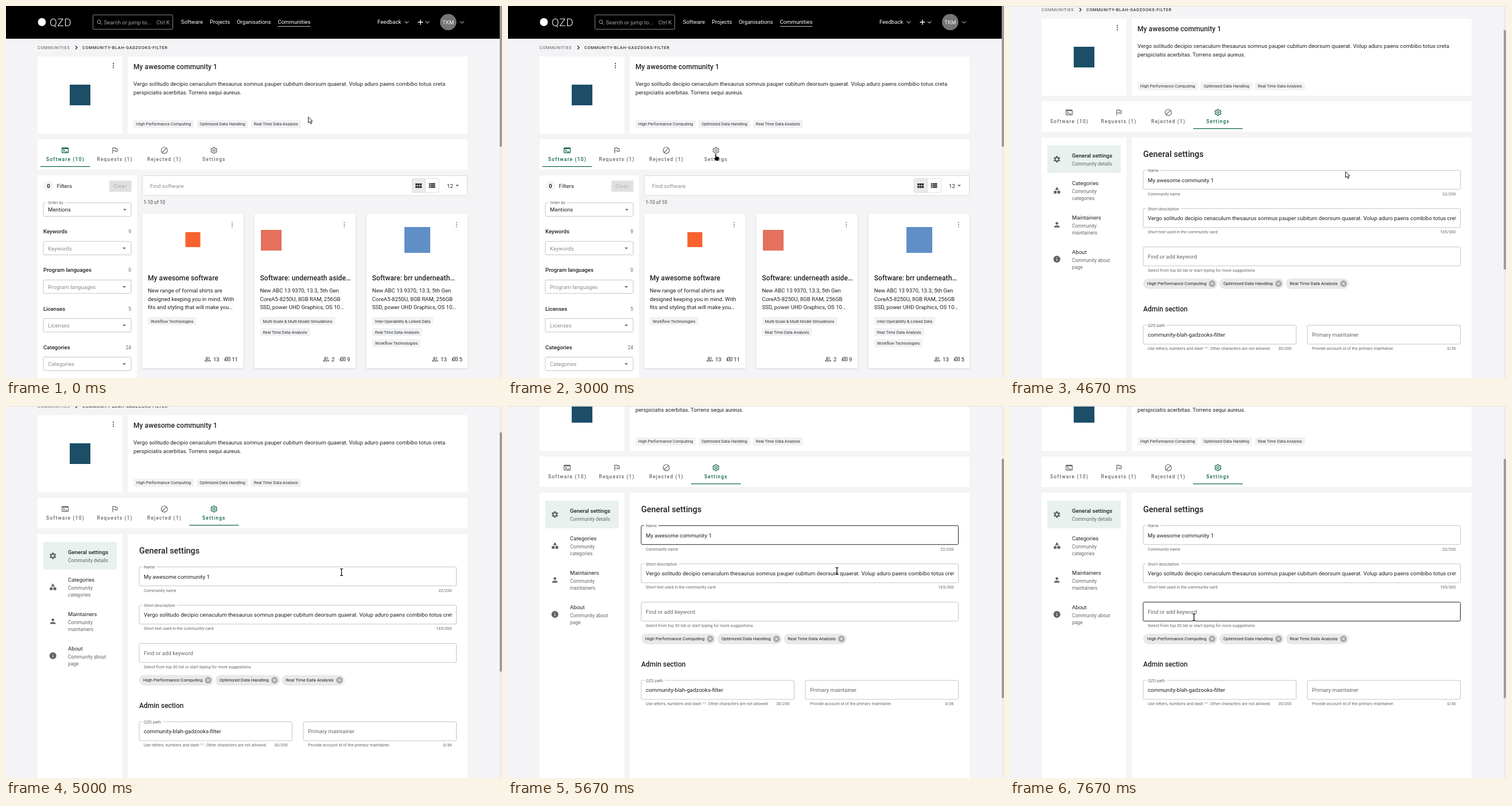
An HTML page that plays this animation: 864x648 px, repeating every 8 s.

```html
<!DOCTYPE html>
<html lang="en">
<head>
<meta charset="utf-8">
<title>Community settings</title>
<style>
  html, body { margin: 0; width: 100%; height: 100%; overflow: hidden; background: #f4f4f6; }
  svg { display: block; font-family: Roboto, sans-serif; }
  .border { fill: none; stroke: #c4c4c4; }
  .border.hover { stroke: #212121; }
  #menu.hover { fill: #dfe9e6; }
  .card { filter: drop-shadow(0 1px 1.5px #0002); }
</style>
</head>
<body>
<svg id="stage" width="864" height="648" viewBox="0 0 864 648"></svg>
<script>
const INK = '#212121', GREY = '#666', PALE = '#8c8c8c', GREEN = '#0a6148';
const LOOP = 8000;
const ruler = document.createElement('canvas').getContext('2d');

const measure = (label, size) => {
  ruler.font = `${size}px Roboto, sans-serif`;
  return ruler.measureText(label.replace('&amp;', '&')).width;
};
const text = (x, y, label, size = 9.6, fill = INK, more = '') =>
  `<text x="${x}" y="${y}" font-size="${size}" fill="${fill}" ${more}>${label}</text>`;
const bold = 'font-weight="500" ', end = 'text-anchor="end"', middle = 'text-anchor="middle" ';
const spaced = n => `letter-spacing="${n}"`;
const title = (x, y, label) => text(x, y, label, 12, INK, bold + spaced(.08));
const rect = (x, y, w, h, fill = '#fff', more = '') =>
  `<rect x="${x}" y="${y}" width="${w}" height="${h}" fill="${fill}" ${more}/>`;
const circle = (x, y, r, fill) => `<circle cx="${x}" cy="${y}" r="${r}" fill="${fill}"/>`;
const line = (d, stroke, width = 1) =>
  `<path d="${d}" fill="none" stroke="${stroke}" stroke-width="${width}"/>`;
const chevron = (x, y, color) => line(`M${x - 3.3} ${y - 1.7}l3.3 3.4 3.3-3.4`, color);
const triangle = (x, y) => `<path d="M${x - 3} ${y - 1.5}h6l-3 3z" fill="${GREY}"/>`;
const dots = (x, y, fill) => [-3.6, 0, 3.6].map(d => circle(x, y + d, 1.15, fill)).join('');
const border = (x, y, w, h, id = '') =>
  `<rect class="border" id="${id}" x="${x}" y="${y}" width="${w}" height="${h}" rx="2"/>`;
const notch = (x, y, label) =>
  rect(x - 3, y - 5, measure(label, 7.2) + 6, 8) + text(x, y, label, 7.2, GREY);

// Icons are drawn on a 24 unit grid
const icon = (x, y, shape, color, scale = .6) =>
  `<g transform="translate(${x - 12 * scale} ${y - 12 * scale}) scale(${scale})" fill="${color}"
    color="${color}" fill-rule="evenodd">${shape}</g>`;
const solid = d => `<path d="${d}"/>`;
const outline = (d, width = 2) => line(d, 'currentColor', width);
const ring = (x, y, r) => `M${x - r} ${y}a${r} ${r} 0 1 0 ${2 * r} 0a${r} ${r} 0 1 0 ${-2 * r} 0z`;
const gear = (inner, outer) => {
  const points = [];
  for (let tooth = 0; tooth < 6; tooth++) {
    for (const [offset, r] of [[-.36, inner], [-.22, outer], [.22, outer], [.36, inner]]) {
      const angle = Math.PI / 2 + tooth * Math.PI / 3 + offset;
      points.push((12 + r * Math.cos(angle)).toFixed(2) + ' ' + (12 + r * Math.sin(angle)).toFixed(2));
    }
  }
  return `M${points.join('L')}z`;
};
const icons = {
  terminal: solid('M4 4h16a2 2 0 0 1 2 2v12a2 2 0 0 1-2 2H4a2 2 0 0 1-2-2V6a2 2 0 0 1 2-2zM4 8v10h16V8zM12 15h6v2h-6zM7.5 17 6 15.6 8.6 13 6 10.4 7.5 9l4 4z'),
  flag: solid('M14 4H5v17h2v-7h5.6l.4 2h7V6h-5.6zM7 6h5.4l.4 2H18v6h-3l-.4-2H7z'),
  block: outline(ring(12, 12, 9) + 'M18.4 5.6 5.6 18.4'),
  gearOutline: outline(gear(6.6, 9.2) + ring(12, 12, 2.8), 1.8),
  gear: solid(gear(7, 10) + ring(12, 12, 3.5)),
  shapes: solid('M12 2l5.5 9h-11zM3 13.5h8v8H3z' + ring(17.5, 17.5, 4.5)),
  person: solid(ring(12, 8, 4) + 'M4 20v-2c0-2.7 5.3-4 8-4s8 1.3 8 4v2z'),
  info: solid(ring(12, 12, 10) + 'M11 7h2v2h-2zM11 11h2v6h-2z'),
  people: outline(ring(9, 8, 3.2) + 'M2 19v-1.5c0-5 14-5 14 0V19zM15 4.8a3.2 3.2 0 0 1 0 6.4M18 14q4 1 4 5h-3', 1.8),
  mention: outline('M5 5h17v13H5zM5 10H2v8h3M9 9.5h9M9 13.5h9', 1.8),
  grid: solid('M3 5h5.3v6H3zM9.4 5h5.3v6H9.4zM15.8 5H21v6h-5.2zM3 12.3h5.3v6H3zM9.4 12.3h5.3v6H9.4zM15.8 12.3H21v6h-5.2z'),
  list: solid('M3 5h4v4H3zM8 5h13v4H8zM3 10h4v4H3zM8 10h13v4H8zM3 15h4v4H3zM8 15h13v4H8z'),
};

const tag = (x, y, label) =>
  rect(x, y, measure(label, 7.2) + 10, 14, '#f1f2f4', 'rx="1.5"') + text(x + 5, y + 9.7, label, 7.2, '#333');
const chip = (x, y, w, label) =>
  rect(x, y, w, 18.6, '#e9e9e9', 'rx="9.3"') + text(x + 7, y + 12, label, 7.8) +
  circle(x + w - 9.2, y + 9.3, 5.6, '#a6a6a6') +
  line(`M${x + w - 11.4} ${y + 7.1}l4.4 4.4m0-4.4l-4.4 4.4`, '#eee', 1.1);
const row = (x, gap, padding, size, labels, draw) => labels.map(label => {
  const w = measure(label, size) + padding;
  const out = draw(x, w, label);
  x += w + gap;
  return out;
}).join('');

const intro = 'Vergo solitudo decipio cenaculum thesaurus somnus pauper cubitum deorsum quaerat. Volup aduro paens combibo totus creta';
const keywords = ['High Performance Computing', 'Optimized Data Handling', 'Real Time Data Analysis'];

const header = () =>
  rect(0, 0, 864, 57, '#000') + circle(62.5, 28, 6.9, '#fff') +
  text(76, 35, 'QZD', 19, '#fff', 'font-weight="300" ' + spaced(.5)) +
  rect(151.5, 15.5, 139, 25, 'none', 'stroke="#858585" rx="1"') +
  line(ring(162, 27.5, 3) + 'M164.2 29.8l3 3', '#aaa') +
  text(170.5, 31.5, 'Search or jump to...', 9.6, '#a3a3a3') + text(262, 31.5, 'Ctrl K', 9.6, '#a3a3a3') +
  [[304.7, 'Software'], [355, 'Projects'], [402, 'Organisations'], [473.4, 'Communities'], [647, 'Feedback']]
    .map(([x, label]) => text(x, 31.3, label, 9.6, '#fff')).join('') +
  line('M473.5 35.5h57', '#bbb') + chevron(698, 28.3, '#fff') +
  line('M717.5 28.3h9m-4.5-4.5v9', '#fff', 1.4) + chevron(734, 28.3, '#fff') +
  circle(770.3, 28, 14.3, '#757575') + text(770.3, 31.5, 'TKM', 9.6, '#eee', middle) +
  chevron(794.5, 28.3, '#fff');

const summary = () =>
  text(55, 75, 'COMMUNITIES', 7.2, '#555', spaced(.72)) + line('M121 69.5l3 3-3 3', INK, 1.2) +
  text(133, 75, 'COMMUNITY-BLAH-GADZOOKS-FILTER', 7.2, '#333', bold + spaced(.72)) +
  rect(55, 88, 148, 134.5) + rect(212, 88, 592, 134.5) + dots(187, 103.8, '#555') +
  rect(111, 137, 36, 36, '#1c4e68') +
  title(222, 110.3, 'My awesome community 1') +
  text(222, 139.3, intro) + text(222, 153.7, 'perspiciatis acerbitas. Torrens sequi aureus.') +
  row(222, 5, 10, 7.2, keywords, (x, w, label) => tag(x, 198.7, label));

const tabs = active =>
  rect(55, 232, 749, 53) +
  [[103, 70, 'Software (10)', 'terminal'], [189.5, 158.5, 'Requests (1)', 'flag'],
   [275.8, 246, 'Rejected (1)', 'block'], [362.2, 342, 'Settings', 'gearOutline']]
    .map(([center, x, label, name], i) => {
      const color = i === active ? GREEN : GREY;
      return icon(center, 251.4, icons[name], color) +
        text(x, 270, label, 8.4, color, bold + spaced(1.2)) +
        (i === active ? rect(center - 43.2, 279, 86.4, 1.2, GREEN) : '');
    }).join('');

const filter = (label, count, i) => {
  const y = 396.2 + i * 67.2;
  return text(65, y, label, 9.6, INK, bold) + text(218, y, count, 8.4, GREY, end) +
    border(65, y + 13.8, 153, 23.5) + text(73, y + 29.3, label, 9.6, PALE) + triangle(206, y + 26);
};

const productCard = (x, logo, name, lines, tags, people, mentions) => {
  const digit = 5.4, right = x + 167;
  const mentionX = right - digit * mentions.length - 7.5;
  const peopleEnd = mentionX - 14;
  return rect(x, 362, 176.5, 269, '#fff', 'rx="2" class="card"') + dots(x + 157, 381, '#999') + logo +
    title(x + 10, 477.8, name) +
    lines.map((s, i) => text(x + 10, 499.3 + i * 14.4, s)).join('') +
    tags.map((s, i) => tag(x + 10, 541.8 + i * 19.2, s)).join('') +
    icon(peopleEnd - digit * people.length - 9.5, 615.2, icons.people, INK, .48) +
    text(peopleEnd, 618.5, people, 9.6, INK, end) +
    icon(mentionX, 615.2, icons.mention, INK, .45) + text(right, 618.5, mentions, 9.6, INK, end);
};

const laptop = ['New ABC 13 9370, 13.3, 5th Gen', 'CoreA5-8250U, 8GB RAM, 256GB', 'SSD, power UHD Graphics, OS 10…'];
const library = () =>
  tabs(0) + rect(55, 295, 173, 353) +
  circle(74, 313.5, 9, '#f3f4f6') + text(74, 317, '0', 9.6, INK, middle + 'font-weight="700"') +
  text(88.5, 317, 'Filters') + rect(180, 304, 38.5, 19.5, '#e0e0e0', 'rx="1"') +
  text(187, 316.8, 'Clear', 8.4, '#b4b4b4', bold + spaced(.9)) +
  border(65, 342.8, 153, 23.5) + notch(73, 345, 'Order by') + text(73, 358.3, 'Mentions') + triangle(207, 355) +
  [['Keywords', 9], ['Program languages', 0], ['Licenses', 5], ['Categories', 24]]
    .map(([label, count], i) => filter(label, count, i)).join('') +
  rect(237.5, 295.5, 566, 34.5, '#fff', 'stroke="#d9d9d9" rx="2"') + text(251, 316.5, 'Find software', 9.6, PALE) +
  rect(707.5, 300.5, 23, 24.5, '#ebebeb') + rect(707.5, 300.5, 46.5, 24.5, 'none', 'stroke="#dcdcdc" rx="2"') +
  line('M730.5 300.5v24.5', '#dcdcdc') +
  icon(718.7, 313.2, icons.grid, '#222') + icon(742.2, 312.8, icons.list, '#444') +
  text(768, 316.5, '12') + triangle(786, 313) + text(239.6, 344.5, '1-10 of 10', 8.4, '#444') +
  productCard(237, rect(312.5, 394, 26, 26, '#f7622e'), 'My awesome software',
    ['New range of formal shirts are', 'designed keeping you in mind. With', 'fits and styling that will make you…'],
    ['Workflow Technologies'], '13', '11') +
  productCard(432.4, rect(444, 390, 36, 36, '#e5705d'), 'Software: underneath aside…', laptop,
    ['Multi-Scale &amp; Multi Model Simulations', 'Real Time Data Analysis'], '2', '9') +
  productCard(627.8, rect(694, 385, 45, 45, '#5f8fc6'), 'Software: brr underneath…', laptop,
    ['Inter-Operability &amp; Linked Data', 'Real Time Data Analysis', 'Workflow Technologies'], '13', '5');

const field = ({ id, x = 232, y, w = 552.5, label, value, hint, help, count = '' }) =>
  border(x, y, w, 33, id) + (label ? notch(x + 8, y + 2.7, label) : '') +
  `<svg x="${x + 8}" y="${y}" width="${w - 16}" height="33">${text(0, 20.4, value || hint, 9.6, value ? INK : GREY)}</svg>` +
  text(x + 8, y + 43.3, help, 7.2, GREY) + text(x + w - 8, y + 43.3, count, 7.2, GREY, end);

const settings = () =>
  tabs(3) + rect(55, 295, 148, 750) + rect(212, 295, 592, 750) +
  rect(65, 309, 128, 48, '#e8f1ee', 'id="menu"') +
  [['gear', 333, 'General settings', 'Community details'], ['shapes', 387, 'Categories', 'Community', 'categories'],
   ['person', 447, 'Maintainers', 'Community', 'maintainers'], ['info', 507, 'About', 'Community about', 'page']]
    .map(([name, y, label, ...lines], i) => {
      const top = y - (i ? 9 : 3);
      return icon(81.7, y, icons[name], '#636363') + text(108, top, label, 9.6, INK, i ? '' : bold) +
        lines.map((s, n) => text(108, top + 13.6 + n * 12, s, 8.4, GREY)).join('');
    }).join('') +
  text(232, 328.5, 'General settings', 14.4, INK, bold) +
  field({ id: 'name', y: 352.3, label: 'Name', value: 'My awesome community 1', help: 'Community name', count: '22/200' }) +
  field({ id: 'about', y: 418.9, label: 'Short description', value: intro, help: 'Short text used in the community card', count: '165/300' }) +
  field({ id: 'keyword', y: 485.7, hint: 'Find or add keyword', help: 'Select from top 30 list or start typing for more suggestions' }) +
  row(232, 3.4, 26, 7.8, keywords, (x, w, label) => chip(x, 540.4, w, label)) +
  text(232, 598.3, 'Admin section', 12, INK, bold) +
  field({ id: 'path', y: 622, w: 266.5, label: 'QZD path', value: 'community-blah-gadzooks-filter',
    help: 'Use letters, numbers and dash "-". Other characters are not allowed.', count: '30/200' }) +
  field({ id: 'owner', x: 518, y: 622, w: 266.5, hint: 'Primary maintainer',
    help: 'Provide account id of the primary maintainer.', count: '0/36' });

const beam = 'M-2.7-6Q0-6 0-4.5Q0-6 2.7-6M0-5V5M-2.7 6Q0 6 0 4.5Q0 6 2.7 6';
const cursors = {
  arrow: '<path d="M0 0v10.3l2.4-2.2 1.8 4 1.8-.8-1.8-3.8h3.2z" fill="#fff" stroke="#000" stroke-width=".9"/>',
  hand: '<path d="M2.5 1.2a1 1 0 0 1 2 0v3.8l4 .9q1.3.3 1.1 1.6l-.5 3q-.3 2.2-2 2.3H5q-1 0-1.600-.9L.3 8.4q-.2-1.1.8-1l1.4.9z" stroke="#fff" stroke-width=".5"/>',
  beam: line(beam, '#fff', 2) + line(beam, '#000', 1.2),
};

const stage = document.getElementById('stage');
stage.innerHTML = rect(0, 0, 864, 648, '#f4f4f6') +
  `<g id="page">${header()}${summary()}<g id="library">${library()}</g><g id="settings">${settings()}</g></g>` +
  rect(0, 0, 864, 1, '#dcdcdc', 'id="edge"') + rect(860, 0, 4, 648, '#ececec') + rect(860, 0, 4, 245, '#9b9b9b', 'id="thumb"') +
  Object.entries(cursors).map(([name, shape]) => `<g id="${name}">${shape}</g>`).join('');

const el = id => document.getElementById(id);
const show = (id, visible) => el(id).setAttribute('display', visible ? 'inline' : 'none');

// time, cursor, x, y, scroll, hovered element
const steps = [
  [0, 'arrow', 526.6, 193.3, 0],
  [1330, 'arrow', 525.6, 192.3, 0],
  [1670, 'beam', 329, 307.5, 0],
  [2000, 'hand', 357.7, 260.5, 0],
  [2330, 'hand', 353.3, 252, 0],
  [2670, 'hand', 351.3, 257, 0],
  [3000, 'hand', 358.3, 257, 0],
  [3670, 'hand', 358.3, 249.5, 0],
  [4000, 'arrow', 584.5, 288.5, 0],
  [4670, 'arrow', 584.5, 288.5, 66],
  [5000, 'beam', 584.5, 289.5, 72],
  [5330, 'beam', 579, 289, 132, 'name'],
  [5670, 'beam', 573, 287.5, 144, 'name'],
  [6000, 'beam', 236.3, 236.5, 144, 'name'],
  [6330, 'hand', 149.3, 203.5, 144, 'menu'],
  [6670, 'hand', 136.3, 196.5, 144, 'menu'],
  [7000, 'beam', 262, 242.5, 144, 'name'],
  [7330, 'beam', 296, 302, 144, 'about'],
  [7670, 'beam', 320.5, 368, 144, 'keyword'],
];

function draw(now) {
  const time = now % LOOP;
  const [, cursor, x, y, scroll, hovered] = steps.findLast(step => step[0] <= time);
  const onSettings = time >= 3330;
  show('library', !onSettings);
  show('settings', onSettings);
  show('edge', scroll > 0);
  el('page').setAttribute('transform', `translate(0 ${-scroll})`);
  el('thumb').setAttribute('y', scroll * .64);
  el('thumb').setAttribute('height', onSettings ? 416.5 : 245);
  for (const name in cursors) show(name, name === cursor);
  el(cursor).setAttribute('transform', `translate(${x} ${y})`);
  for (const id of ['name', 'about', 'keyword', 'menu']) el(id).classList.toggle('hover', id === hovered);
  requestAnimationFrame(draw);
}
draw(0);
</script>
</body>
</html>
```
